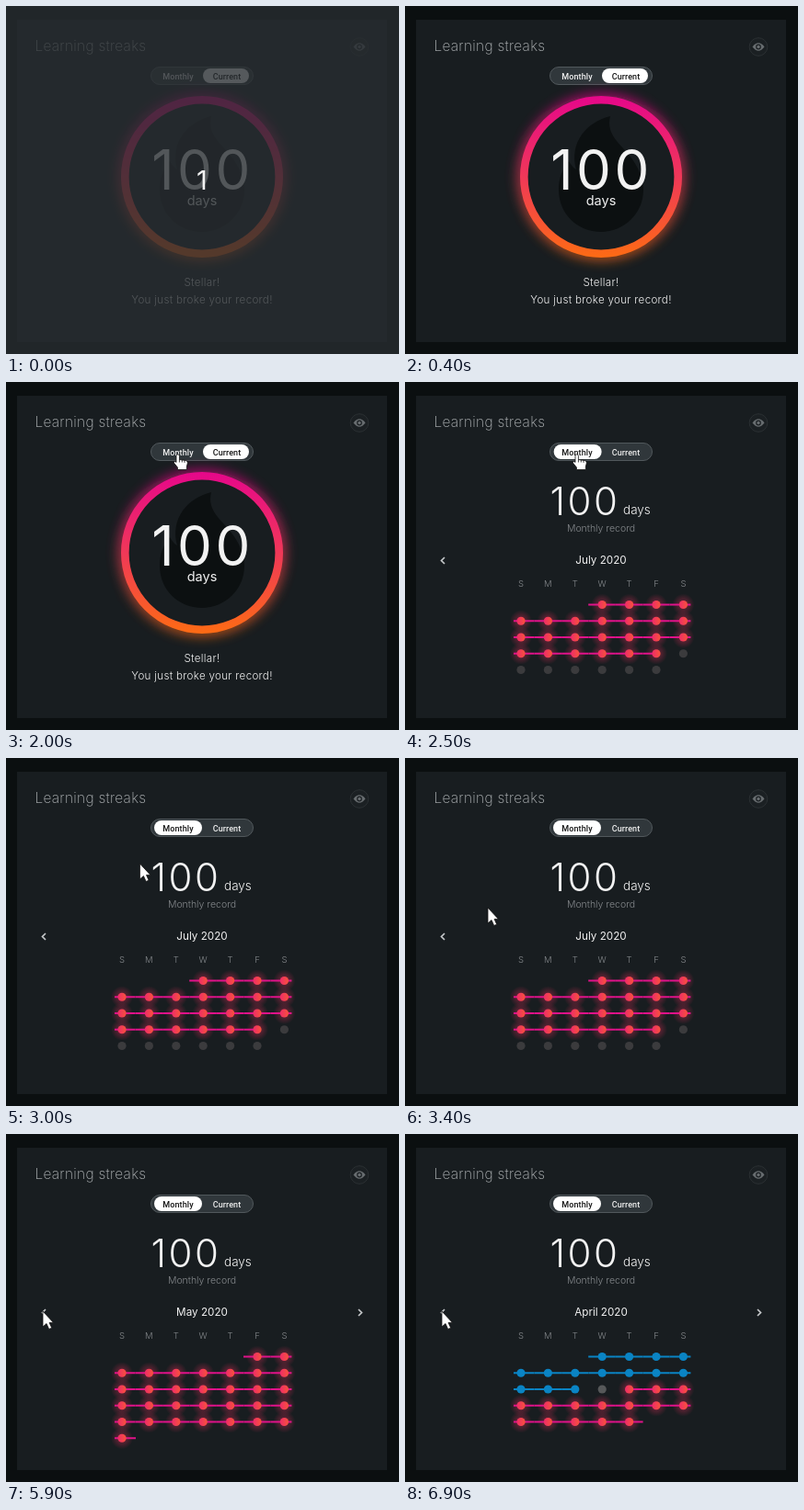
These frames come from a looping animation (427 px wide and 379 px high, 8000 ms). An HTML page:

```html
<!DOCTYPE html>
<html lang="en">
<meta charset="utf-8">
<title>Learning streaks</title>
<style>
  html, body { margin: 0; width: 100%; height: 100%; overflow: hidden; background: #0b0f10; }
  svg { display: block; width: 427px; height: 379px; }
  text { font-family: Inter, "Open Sans", sans-serif; font-weight: 300; fill: #f2f2f2; }
  .mid { text-anchor: middle; }
  .dim { fill: #85898c; }
  .tab { font: 500 9px Roboto, sans-serif; letter-spacing: .1px; }
  .wide { letter-spacing: .3px; }
  .title { font-weight: 200; letter-spacing: .3px; fill: #b4b8ba; }
  .normal { font-weight: 400; }
  .arrow { fill: none; stroke: #c4c7c9; stroke-width: 1.7; }
</style>
<svg viewBox="0 0 427 379">
  <defs>
    <linearGradient id="hot" x1="0" y1="98" x2="0" y2="274" gradientUnits="userSpaceOnUse">
      <stop stop-color="#e6078a"/><stop offset=".5" stop-color="#f03858"/><stop offset="1" stop-color="#fd6b14"/>
    </linearGradient>
    <linearGradient id="pink"><stop stop-color="#ee2c68"/><stop offset="1" stop-color="#f7523c"/></linearGradient>
    <radialGradient id="glow">
      <stop offset=".2" stop-color="#ee2c5c" stop-opacity=".38"/><stop offset="1" stop-color="#ee2c5c" stop-opacity="0"/>
    </radialGradient>
    <filter id="blur" x="-20%" y="-20%" width="140%" height="140%"><feGaussianBlur stdDeviation="6.5"/></filter>
  </defs>

  <rect x="12" y="15" width="402" height="351" fill="#181d20"/>
  <text class="title" x="31.500" y="49" font-size="15.400">Learning streaks</text>
  <circle cx="384" cy="44.500" r="9.800" fill="#1b2023" stroke="#2b3033"/>
  <path d="M377.500 44.500Q384 36.100 390.500 44.500Q384 52.900 377.500 44.500z" fill="#686d70"/>
  <circle cx="384" cy="44.500" r="2.300" fill="#686d70" stroke="#1b2023" stroke-width="1.200"/>

  <rect x="157.500" y="66.500" width="111" height="19" rx="9.500" fill="#30373b" stroke="#51585c"/>
  <rect id="pill" y="68" height="16" rx="8" fill="#fff"/>
  <text id="tabM" class="tab mid" x="187" y="80">Monthly</text>
  <text id="tabC" class="tab mid" x="240" y="80">Current</text>

  <g id="current">
    <circle cx="213" cy="186" r="85" fill="none" stroke="url(#hot)" stroke-width="11" filter="url(#blur)" opacity=".75"/>
    <circle cx="213" cy="186" r="80" fill="#181d20"/>
    <path fill="#0c1011" d="M223 120C218 140 234 150 244 163C254 176 259 188 259 200C259 226 238 246 213 246C187 246 167 226 167 200C167 187 171 177 178 169Q182 176 186 178C178 148 198 126 223 120z"/>
    <circle cx="213" cy="186" r="83.700" fill="none" stroke="url(#hot)" stroke-width="8.600"/>
    <text class="mid normal" x="213.500" y="200" font-size="60" letter-spacing="3.500">100</text>
    <text class="mid normal" x="213" y="217" font-size="14.500">days</text>
    <text class="mid wide" x="213" y="305" font-size="11.600">Stellar!</text>
    <text class="mid wide" x="213" y="324" font-size="11.600">You just broke your record!</text>
  </g>

  <g id="monthly">
    <text x="157.500" y="145" font-size="42" letter-spacing="2.500">100</text>
    <text x="237" y="144" font-size="13.500">days</text>
    <text class="mid dim" x="213" y="163" font-size="10.500">Monthly record</text>
    <text id="name" class="mid normal" x="213" y="198" font-size="11.700"></text>
    <path class="arrow" d="M43 191l-3.500 3.500l3.500 3.500"/>
    <path id="next" class="arrow" d="M383 191l3.500 3.500l-3.500 3.500"/>
    <g id="week"></g>
    <g id="days"></g>
  </g>

  <g id="intro">
    <rect width="427" height="379" fill="#282d31" opacity=".79"/>
    <text class="mid normal" x="213" y="200" font-size="29">1</text>
  </g>

  <g id="cursor" stroke="#111" stroke-width=".8" fill="#fff">
    <path id="point" d="M0 0V17l4-3.500l2.700 6l3-1.300l-2.600-5.800H11.500z"/>
    <path id="hand" d="M-2 1.500a1.700 1.700 0 0 1 3.400 0V5.500l7 1q2 .5 2 2.500l-1 4v3.500h-10v-2.500l-4-5q-.5-2 1.500-1.500l1.100 1zM1.400 5.500v3M4.300 6v2.500M7 6.400v2.500"/>
  </g>
</svg>
<script>
const $ = id => document.getElementById(id);
const clamp = v => Math.max(0, Math.min(1, v));
const show = (id, on) => $(id).style.display = on ? '' : 'none';
const colX = c => 126 + 29.4 * c;
const rowY = r => 242.5 + 17.75 * r;

// first: weekday of day 1; runs: [first day, last day, [dot, line]]
const PINK = ['url(#pink)', '#e0128a'], BLUE = ['#0a84c4', '#0a84c4'];
const months = [
  { at: 0, name: 'July 2020', first: 3, days: 31, off: '#3b3b3d', runs: [[1, 24, PINK]] },
  { at: 4900, name: 'June 2020', first: 1, days: 30, runs: [[1, 30, PINK]] },
  { at: 5900, name: 'May 2020', first: 5, days: 31, runs: [[1, 31, PINK]] },
  { at: 6900, name: 'April 2020', first: 3, days: 30, off: '#565859', runs: [[1, 14, BLUE], [16, 30, PINK]] }
];

$('week').innerHTML = [...'SMTWTFS'].map((d, c) =>
  `<text class="mid dim" x="${colX(c)}" y="223" font-size="9.500">${d}</text>`).join('');

function calendar({ first, days, off, runs }) {
  let glows = '', lines = '', dots = '';
  for (let d = 1; d <= days; d++) {
    const cell = d + first - 1, c = cell % 7, x = colX(c), y = rowY(Math.floor(cell / 7));
    const run = runs.find(([a, b]) => d >= a && d <= b);
    dots += `<circle cx="${x}" cy="${y}" r="4.600" fill="${run ? run[2][0] : off}"/>`;
    if (!run) continue;
    const [a, b, [, stroke]] = run;
    const left = c == 0 ? 8 : d == 1 ? 15 : d == a ? 0 : 14.7;
    const right = c == 6 ? 8 : d == days ? 15 : d == b ? 0 : 14.7;
    lines += `<path d="M${x - left} ${y}H${x + right}" stroke="${stroke}" stroke-width="2"/>`;
    if (run[2] == PINK) glows += `<circle cx="${x}" cy="${y}" r="12" fill="url(#glow)"/>`;
  }
  return glows + lines + dots;
}

// time, x, y of the pointer tip
const path = [[500, 401, 143], [1000, 271, 105], [1299, 271, 105], [1300, 187, 79], [2700, 187, 79],
  [3400, 90, 163], [3500, 75, 172], [3800, 50, 187], [4100, 40, 193], [8000, 40, 193]];

function tip(t) {
  const i = Math.max(1, path.findIndex(p => p[0] >= t));
  const [t0, x0, y0] = path[i - 1], [t1, x1, y1] = path[i], u = clamp((t - t0) / (t1 - t0));
  return [x0 + (x1 - x0) * u, y0 + (y1 - y0) * u];
}

const grey = v => `rgb(${v},${v},${v})`;
let shown;

function draw(now) {
  const t = Math.floor(now % 8000 / 100) * 100;   // the picture moves in tenths of a second
  const fade = clamp((t - 2100) / 400);
  const slide = 1 - (1 - clamp((t - 2100) / 600)) ** 4;

  show('intro', t < 400);
  $('current').style.opacity = 1 - fade;
  $('monthly').style.opacity = fade;
  $('pill').setAttribute('x', 214 - 53 * slide);
  $('pill').setAttribute('width', 50 + 2 * slide);
  $('tabM').style.fill = grey(240 - 220 * slide);
  $('tabC').style.fill = grey(20 + 220 * slide);

  const month = months.findLast(m => t >= m.at);
  if (month != shown) {
    shown = month;
    $('name').textContent = month.name;
    $('days').innerHTML = calendar(month);
    show('next', month.at > 0);
  }

  const hand = t >= 1300 && t <= 2700;
  show('cursor', t >= 500);
  show('hand', hand);
  show('point', !hand);
  $('cursor').setAttribute('transform', `translate(${tip(t)})`);
}

const start = performance.now();
function loop() {
  draw(performance.now() - start);
  requestAnimationFrame(loop);
}
loop();
</script>
</html>
```
